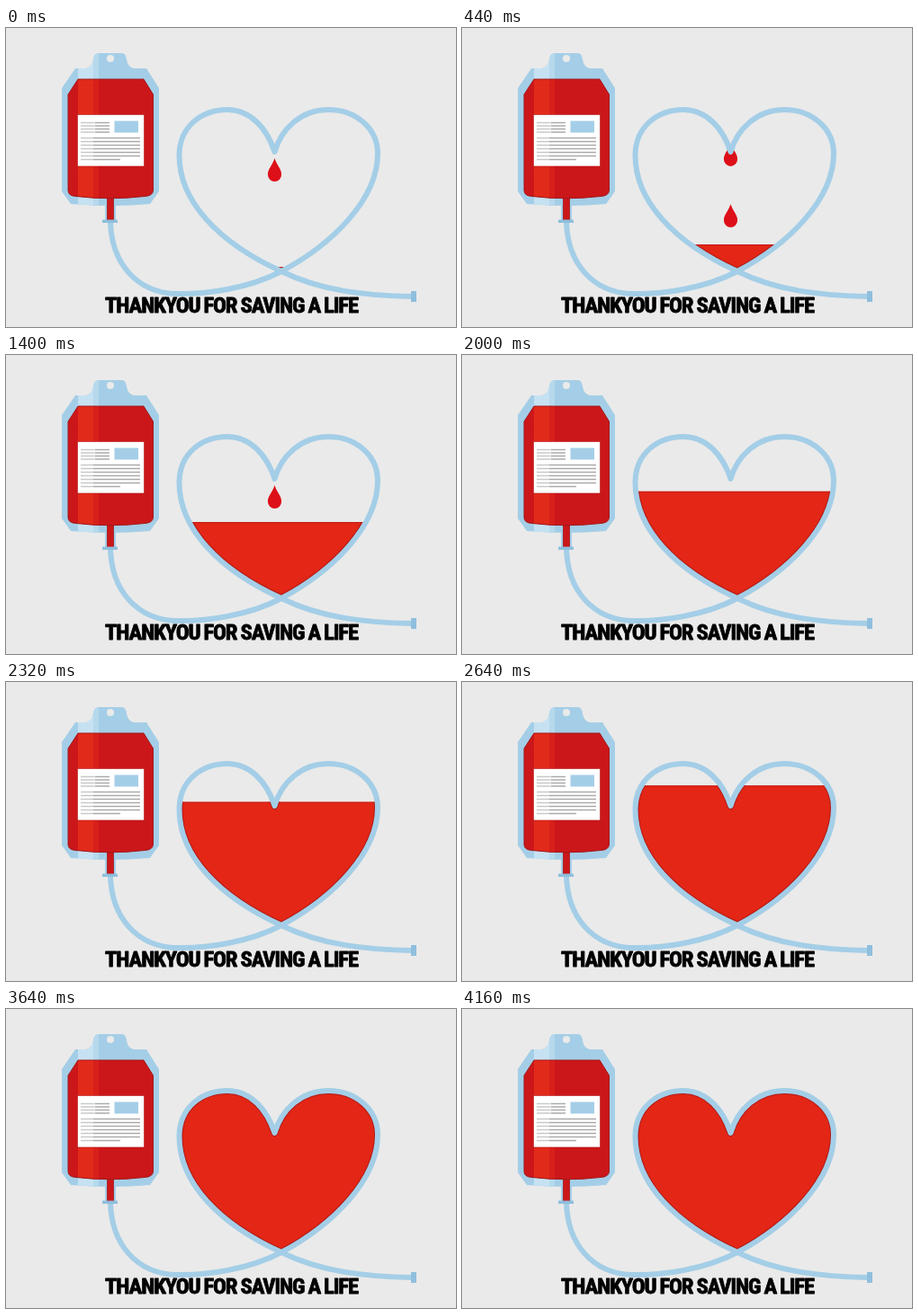
An HTML page that plays this animation: 500 by 333 pixels, repeating every 4200 ms.

```html
<!DOCTYPE html>
<html lang="en">
<head>
<meta charset="utf-8">
<title>Thank you</title>
<style>
  html, body { margin: 0; width: 100%; height: 100%; overflow: hidden; background: #eaeaea; }
  svg { display: block; width: 100%; height: 100%; stroke-linejoin: round; }
  text {
    font: 900 30px "Roboto Condensed", Roboto, "Open Sans", sans-serif;
    font-stretch: 75%;
    letter-spacing: -.045em;
    word-spacing: -.02em;
    text-anchor: middle;
    stroke: #000;
    stroke-width: .8;
  }
</style>
</head>
<body>
<svg viewBox="0 0 500 333">
  <defs>
    <path id="heart" d="M306 271C238 240 192 194 192.5 141C193 110 217 91 246 91C272 91 290 112 298.5 138C306 112 328 91 358 91C389 91 413 112 413 140C413 190 364 240 306 271Z"/>
    <path id="shell" d="M77 45H89Q96 43 97 35Q98 28 103 28H129Q133 28 134 35Q135 43 142 45H156L170 67V182L160 196Q116 200 72 196L62 182V67Z"/>
    <path id="blood" d="M80 57H153L163.5 74V181Q163 187 154 187.5Q116 192 78 187.5Q69 187 69 181V74Z"/>
    <path id="drop" d="M0-1C2 6 7.6 11 7.6 17A7.6 8 0 0 1-7.6 17C-7.6 11-2 6 0-1Z"/>
    <clipPath id="inHeart"><use href="#heart"/></clipPath>
    <clipPath id="inShell"><use href="#shell"/></clipPath>
    <clipPath id="inBlood"><use href="#blood"/></clipPath>
    <clipPath id="inLiquid"><rect id="level" x="180" width="250" height="300"/></clipPath>
  </defs>

  <!-- heart contents -->
  <g clip-path="url(#inHeart)">
    <g fill="#dd0f18">
      <use class="drop" href="#drop"/>
      <use class="drop" href="#drop"/>
    </g>
    <g clip-path="url(#inLiquid)">
      <use href="#heart" fill="#e32616" stroke="#b01a16" stroke-width="8"/>
      <rect id="surface" x="180" width="250" height="1" fill="#c01d16"/>
    </g>
  </g>

  <!-- tube -->
  <g fill="none" stroke="#a4cee7" stroke-width="6">
    <use href="#heart"/>
    <path d="M116 215C117 262 145 294 188 296C222 297 270 290 306 271C350 293 400 298 452 299"/>
  </g>
  <rect x="450" y="293" width="6" height="12" fill="#8fbfdd"/>

  <!-- bag -->
  <use href="#shell" fill="#a4cee7"/>
  <g clip-path="url(#inShell)">
    <path d="M80 28H97V200H80Z" fill="#c6e2f2"/>
    <path d="M97 28H103V200H97Z" fill="#b6d9ed"/>
  </g>
  <circle cx="116" cy="34" r="4" fill="#eaeaea"/>
  <path d="M110 190H122V215H110Z" fill="#a4cee7"/>
  <path d="M112.5 186H119.5V214H112.5Z" fill="#cb1719" stroke="#a3191d" stroke-width=".8"/>
  <use href="#blood" fill="#cb1719"/>
  <g clip-path="url(#inBlood)">
    <path d="M80 50H97V195H80Z" fill="#e22a1a"/>
    <path d="M97 50H103V195H97Z" fill="#d8201a"/>
  </g>
  <use href="#blood" fill="none" stroke="#a3191d"/>
  <rect x="107" y="213.5" width="17" height="3.5" fill="#8fbfdd"/>

  <!-- label -->
  <rect x="79.5" y="96.5" width="74" height="57.5" fill="#fff" stroke="#b5171a" stroke-width=".6"/>
  <rect x="120.5" y="103.5" width="26.5" height="13" fill="#a4cee7"/>
  <path d="M83 105.5H115M83 109H115M83 112.5H115M83 116H115M83 122.5H149M83 126.5H149M83 130.5H149M83 134.5H149M83 138.5H149M83 142.5H149M83 146.5H127" stroke="#aaa" stroke-width="1.5"/>
  <path d="M98 104V117" stroke="#fff"/>
  <rect x="80" y="97" width="17" height="56" fill="#fff" opacity=".35"/>

  <text id="caption" x="250.5">THANKYOU FOR SAVING A LIFE</text>
</svg>
<script>
  const LOOP = 4200, DRIP = 280, STEP = 40;
  const level = document.getElementById("level");
  const surface = document.getElementById("surface");
  const drops = document.querySelectorAll(".drop");
  const caption = document.getElementById("caption");

  // Pick the type size at which the caption spans its line.
  const size = Math.min(30, 30 * 281 / caption.getComputedTextLength());
  caption.style.fontSize = size + "px";
  caption.setAttribute("y", 308.2 + size * .356);

  // Height of a drop's tip: it starts at rest and accelerates.
  const dropY = age => 146 + .218 * age + .00063 * age * age;

  function draw(now) {
    const t = Math.floor(now % LOOP / STEP) * STEP;
    const y = 266 - .0571 * t;
    level.setAttribute("y", y);
    surface.setAttribute("y", y);
    drops.forEach((drop, i) => {
      const age = Math.max(-173, t % DRIP - i * DRIP);
      drop.setAttribute("transform", `translate(298.5 ${dropY(age)})`);
      drop.setAttribute("visibility", age > -173 ? "visible" : "hidden");
    });
  }

  const start = performance.now();
  function tick() {
    draw(performance.now() - start);
    requestAnimationFrame(tick);
  }
  tick();
</script>
</body>
</html>
```
